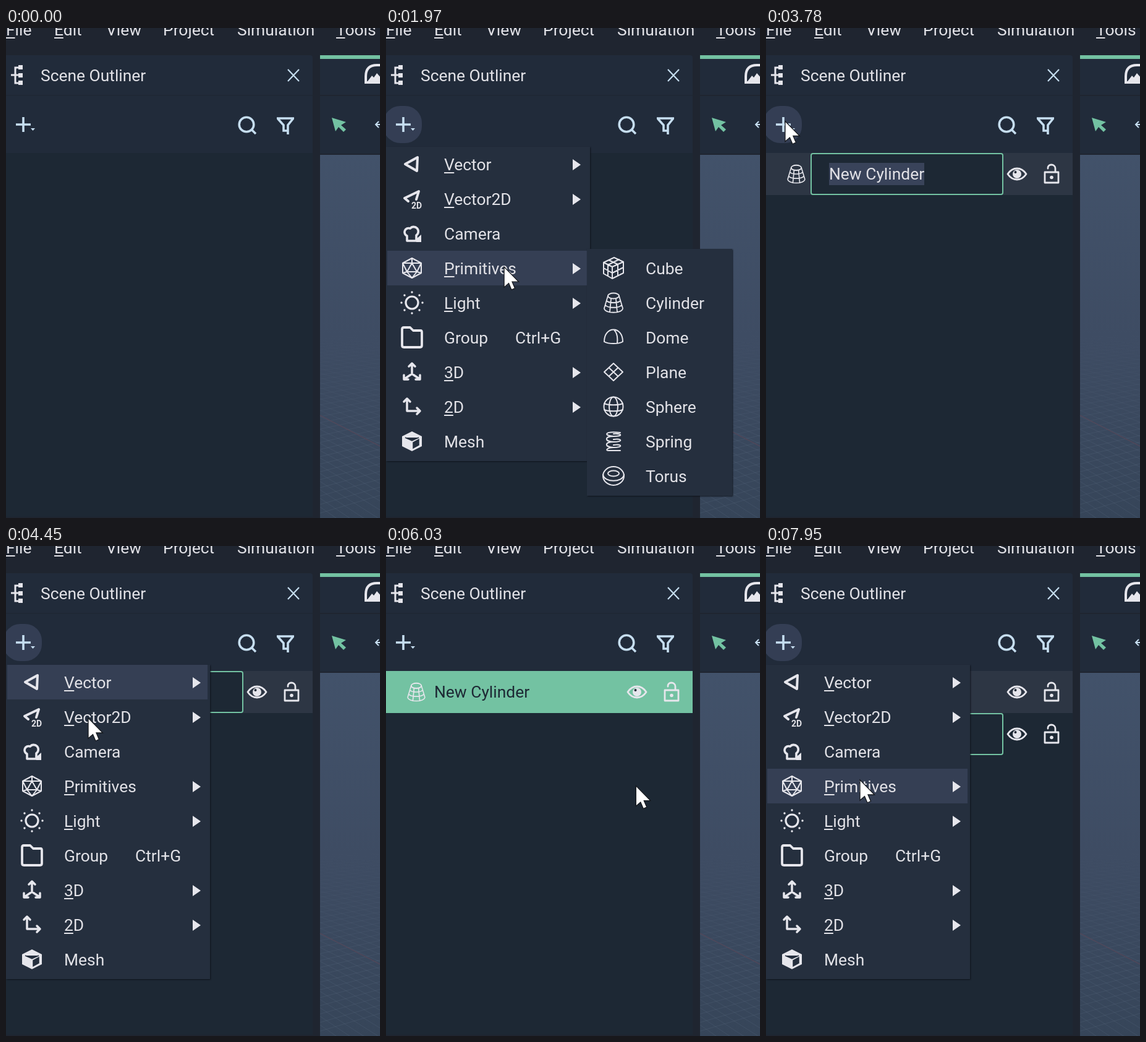
An HTML page for the animation above (8 s loop, 605 by 792 pixels).

```html
<!DOCTYPE html>
<html lang="en">
<head>
<meta charset="utf-8">
<title>Scene Outliner</title>
<style>
  html, body { margin: 0; width: 100%; height: 100%; overflow: hidden; background: #1f2530; }
  svg { display: block; width: 605px; height: 792px; }
  text { font: 26.4px Roboto, sans-serif; fill: #e2e2e7; white-space: pre; }
  .line { fill: none; stroke: #e6e6ec; stroke-width: 2; stroke-linejoin: round; stroke-linecap: round; }
  .solid { fill: #e6e6ec; }
  .tool { fill: none; stroke: #c6def0; stroke-width: 3.6; }
</style>
</head>
<body>
<svg id="stage" viewBox="0 0 605 792">
  <defs>
    <linearGradient id="sky" x2="0" y2="1">
      <stop offset="0" stop-color="#42526a"/>
      <stop offset=".5" stop-color="#3e4c63"/>
      <stop offset="1" stop-color="#364559"/>
    </linearGradient>
    <linearGradient id="fade" gradientUnits="userSpaceOnUse" x1="0" y1="490" x2="0" y2="680">
      <stop offset="0" stop-color="#8fa3bb" stop-opacity="0"/>
      <stop offset="1" stop-color="#8fa3bb" stop-opacity=".1"/>
    </linearGradient>
    <filter id="shadow" x="-10%" y="-10%" width="120%" height="120%" color-interpolation-filters="sRGB">
      <feDropShadow dx="1" dy="1" stdDeviation="1.2" flood-color="#0c1118" flood-opacity=".9"/>
    </filter>
    <clipPath id="viewport"><rect x="508" y="205" width="97" height="587"/></clipPath>
  </defs>

  <rect width="605" height="792" fill="#1f2530"/>
  <path d="M0 44H492Q496 44 496 48V108H0Z" fill="#212b3a"/>
  <rect y="110" width="496" height="92" fill="#212b3a"/>
  <rect y="108" width="496" height="2" fill="#1f2835"/>
  <rect y="202" width="496" height="588" fill="#1d2834"/>
  <rect x="508" y="44" width="97" height="6" fill="#73c2a2"/>
  <rect x="508" y="50" width="97" height="58" fill="#212b3a"/>
  <rect x="508" y="110" width="97" height="93" fill="#212b3a"/>
  <rect x="508" y="205" width="97" height="587" fill="url(#sky)"/>
  <path id="grid" clip-path="url(#viewport)" fill="none" stroke="url(#fade)"/>
  <path d="M508 626L605 676" stroke="#534759" stroke-width="1.3"/>

  <g id="labels"></g>
  <path d="M8 76H20M21 64H15V89H21" class="line" style="stroke-linecap:butt;stroke-linejoin:miter;stroke-width:3"/>
  <path d="M20 60h7v7h-7zM20 73h7v7h-7zM20 85h7v7h-7z" class="solid"/>
  <path d="M456 67L474 86M474 67L456 86" class="tool" style="stroke-width:2.2"/>
  <rect id="button" x="-4" y="126" width="62" height="60" rx="27" fill="#343e54"/>
  <path d="M16 156H40M28 144V168" class="tool"/>
  <path d="M40 162H47L43.5 166Z" fill="#c6def0"/>
  <circle cx="389" cy="156" r="11.8" class="tool"/>
  <path d="M397 164L404 171" class="tool"/>
  <path d="M438 146H466M440 147L449 157V166H456M464 147L456 157V172" class="tool"/>
  <path d="M527 145L550 152L542 157L550 164L546 168L538 160L533 167Z" fill="#73c2a2"/>
  <path d="M606 156H599M603 151L598 156L603 161" class="tool" style="stroke-width:2"/>
  <path d="M606 60H600Q582 60 582 78V88H606" class="line" style="stroke-width:4;stroke-linejoin:miter"/>
  <path d="M585 86L592 77L595 80L600 73L606 80V86Z" class="solid"/>

  <g id="rows"></g>
  <g id="menu"></g>
  <g id="submenu"></g>
  <path id="cursor" d="M0 0V33L7.5 26.5L12 37L17.5 34.5L13 24H23.5Z" fill="#fff" stroke="#15181d" stroke-width="1.3"/>
</svg>

<script>
const $ = id => document.getElementById(id);
const show = (node, on) => { node.style.display = on ? '' : 'none'; };
const line = (d, width = 2) => `<path class="line" d="${d}" style="stroke-width:${width}"/>`;
const solid = d => `<path class="solid" d="${d}"/>`;
const oval = (cy, rx, ry, width = 2) =>
  `<ellipse class="line" cy="${cy}" rx="${rx}" ry="${ry}" style="stroke-width:${width}"/>`;
const text = (x, y, s, mark = false) => `<text x="${x}" y="${y}"${mark ? ' data-mark' : ''}>${s}</text>`;
const at = (x, y, body, scale = 1) => `<g transform="translate(${x} ${y}) scale(${scale})">${body}</g>`;

const rays = Array.from({ length: 8 }, (_, i) => {
  const a = i * Math.PI / 4;
  return `<circle class="solid" cx="${17 * Math.cos(a)}" cy="${17 * Math.sin(a)}" r="1.7"/>`;
}).join('');

// Icons are centred on 0,0.
const icons = {
  vector: line('M-11 0L9 -11L8 11Z', 4),
  vector2d: line('M-6 4L-12 -1L11 -12L7 1', 4) +
    '<text x="-1" y="16" style="font-size:14px;font-weight:700">2D</text>',
  camera: line('M-8 12V4A6 6 0 1 1 -3 -8A7.5 7.5 0 1 1 7 3V12Z', 3.6) + solid('M7 9L15 2V14H7Z'),
  primitives: line('M0 -16L15 -8V8L0 16L-15 8V-8ZM0 -8L-8 6H8ZM0 -16V-8L-15 -8L-8 6L-15 8M0 -8L15 -8L8 6L15 8M-8 6L0 16L8 6'),
  light: oval(0, 10, 10, 3.2) + rays,
  group: line('M-16 -13Q-16 -16 -13 -16H-3L2 -11H14Q16 -11 16 -8V13Q16 16 13 16H-13Q-16 16 -16 13Z', 3.8),
  axes3: line('M0 -13V3L-12 11M0 3L12 11M-5 -9L0 -14L5 -9M-13 5V12H-6M13 5V12H6', 3.5),
  axes2: line('M-8 -13V7H12M-13 -8L-8 -13L-3 -8M8 2L13 7L8 12', 3.5),
  mesh: solid('M0 -16L16 -8V8L0 16L-16 8V-8Z') +
    '<path d="M2 11V2L11 -3V6ZM-11 -6L0 -1L11 -6" fill="#252f3e" stroke="#252f3e" stroke-width="1.5"/>',
  cube: line('M1 -17L16 -10V8L-2 17L-16 9V-9ZM-16 -9L-2 -2L16 -10M-2 -2V17M-8 -13L7 -6V12M9 -14L-9 -5V13M-16 0L-2 8L16 -1'),
  cylinder: line('M-9 -11L-15 9C-15 18 15 18 15 9L9 -11M-11 -3C-7 1 7 1 11 -3M-13 4C-9 9 9 9 13 4M-4 -6L-6 15M4 -6L6 15', 1.8) +
    oval(-11, 9, 4.5),
  dome: line('M-15 7C-15 -19 15 -19 15 7C8 11 -8 11 -15 7M1 -12C6 -7 7 1 6 9'),
  plane: line('M0 -14L15 0L0 14L-15 0ZM-7.5 -7L7.5 7M7.5 -7L-7.5 7'),
  sphere: oval(0, 15.5, 15.5) + oval(0, 7, 15.5) +
    line('M-15 -5C-8 -2 8 -2 15 -5M-15 5C-8 8 8 8 15 5'),
  spring: line('M11 -14C-16 -17 -16 -9 0 -8C16 -8 14 -13 0 -12M0 -8C-15 -8 -15 0 0 1C16 1 14 -5 0 -3M0 1C-15 1 -15 9 0 10C16 10 14 4 0 6M0 10C-10 10 -14 15 -8 15H11'),
  torus: oval(0, 17, 15) + oval(-4, 9, 4.5) + line('M-17 -2C-15 11 15 11 17 -2'),
  eye: line('M-15 0C-7 -12 7 -12 15 0C7 12 -7 12 -15 0Z', 2.8) +
    '<circle class="solid" r="7"/><circle cx="-2.5" cy="-3" r="2" fill="#1d2834"/>',
  lock: line('M-11 -3H11V14H-11ZM-6 -9C-7 -17 6 -17 6 -9V-3', 2.8) +
    '<circle class="solid" cy="5.5" r="2.8"/>'
};

// icon, label, has a submenu, shortcut
const menuItems = [
  ['vector', 'Vector', true], ['vector2d', 'Vector2D', true], ['camera', 'Camera'],
  ['primitives', 'Primitives', true], ['light', 'Light', true], ['group', 'Group', false, 'Ctrl+G'],
  ['axes3', '3D', true], ['axes2', '2D', true], ['mesh', 'Mesh']
];
const shapes = ['Cube', 'Cylinder', 'Dome', 'Plane', 'Sphere', 'Spring', 'Torus'];
const pitch = 56, menuTop = 192, subTop = 360;

$('labels').innerHTML = text(56, 86, 'Scene Outliner') +
  [[0, 'File', true], [78, 'Edit', true], [162, 'View'], [254, 'Project'], [374, 'Simulation'], [534, 'Tools', true]]
    .map(([x, s, mark]) => text(x, 12, s, mark)).join('');

$('menu').innerHTML = '<rect y="192" width="330" height="508" fill="#252f3e" filter="url(#shadow)"/>' +
  '<rect id="menuHover" x="2" width="324" height="56" fill="#353f54"/>' +
  menuItems.map(([icon, label, more, keys], i) => {
    const y = menuTop + 28 + i * pitch;
    return at(42, y, icons[icon]) + text(94, y + 10, label, more) +
      (more ? solid(`M302 ${y - 8}L315 ${y + 1}L302 ${y + 10}Z`) : '') +
      (keys ? text(209, y + 10, keys) : '');
  }).join('');

$('submenu').innerHTML = '<rect x="325" y="357" width="235" height="399" fill="#252f3e" filter="url(#shadow)"/>' +
  '<rect id="subHover" x="327" width="232" height="56" fill="#353f54"/>' +
  shapes.map((label, i) => {
    const y = subTop + 28 + i * pitch;
    return at(368, y, icons[label.toLowerCase()]) + text(420, y + 10, label);
  }).join('');

function outlinerRow(id, label, icon, y, selected) {
  return `<g id="${id}"><rect id="${id}Back" y="${y - 34}" width="496" height="68" fill="none"/>` +
    at(49, y, icons[icon], .92) +
    `<g id="${id}Edit"><rect x="73" y="${y - 33}" width="310" height="66" rx="3" fill="#1d2834" stroke="#73c2a2" stroke-width="2"/>` +
    `<rect x="102" y="${y - 18}" width="${selected}" height="36" fill="#39435a"/>${text(102, y + 9, label)}</g>` +
    `<g id="${id}Name">${text(78, y + 9, label)}</g>` +
    at(406, y, icons.eye) + at(462, y, icons.lock) + '</g>';
}
$('rows').innerHTML = outlinerRow('first', 'New Cylinder', 'cylinder', 236, 154) +
  outlinerRow('second', 'New Cube', 'cube', 304, 118);
show($('secondName'), false);

for (const label of document.querySelectorAll('[data-mark]')) {
  const x = label.getAttribute('x'), y = +label.getAttribute('y') + 3;
  label.insertAdjacentHTML('afterend',
    `<rect x="${x}" y="${y}" width="${label.getSubStringLength(0, 1)}" height="2" fill="#e2e2e7"/>`);
}

let grid = '';
for (let i = 0; i < 34; i++) {
  const y = 500 + 3 * i + .17 * i * i;
  grid += `M508 ${y}L605 ${y - 4 - i * .75}M508 ${y - 10}L605 ${y - 6 + i * 1.9}`;
}
$('grid').setAttribute('d', grid);

// The picture advances in runs of evenly spaced steps: start, end, count.
const runs = [[130, 1130, 8], [1260, 2260, 8], [2400, 2970, 5], [3100, 3380, 3], [3510, 4450, 8],
  [4590, 5220, 5], [5390, 5550, 2], [5710, 6740, 7], [6920, 7950, 7]];
const steps = [0];
for (const [a, b, n] of runs)
  for (let i = 0; i < n; i++) steps.push(a + (b - a) * i / (n - 1));

// Cursor waypoints: time, x, y.
const route = [
  [130, 110, 12], [410, 42, 126], [550, 28, 146], [1130, 28, 146], [1260, 53, 200], [1550, 130, 320],
  [1830, 190, 386], [1980, 300, 400], [2260, 430, 440], [2540, 425, 440], [2970, 367, 391],
  [3380, 290, 290], [3780, 30, 150], [4045, 30, 150], [4315, 110, 240], [4450, 133, 278],
  [4590, 150, 320], [4750, 168, 354], [5070, 187, 376], [5220, 190, 379], [5550, 410, 388],
  [5880, 405, 388], [6740, 41, 170], [6920, 30, 150], [7260, 30, 150], [7600, 90, 270],
  [7780, 146, 366], [7950, 152, 378]
];
const open = {
  button: [[690, 2540], [3775, 5880], [7090, 8000]],
  menu: [[840, 2540], [3905, 5880], [7260, 8000]],
  submenu: [[1825, 2540], [5060, 5880]],
  first: [[3100, 8000]],
  second: [[6220, 8000]],
  firstEdit: [[3100, 5880]],
  firstName: [[5880, 8000]]
};
const during = (id, t) => open[id].some(([a, b]) => t >= a && t < b);

function cursorAt(t) {
  const i = route.findIndex(p => p[0] > t);
  if (i === 0) return route[0].slice(1);
  if (i < 0) return route[route.length - 1].slice(1);
  const [a, b] = [route[i - 1], route[i]], k = (t - a[0]) / (b[0] - a[0]);
  return [a[1] + (b[1] - a[1]) * k, a[2] + (b[2] - a[2]) * k];
}

function hover(node, row, count, top) {
  const on = row >= 0 && row < count;
  show(node, on);
  if (on) node.setAttribute('y', top + row * pitch);
}

function render(t) {
  let i = steps.length - 1;
  while (steps[i] > t + .5) i--;
  const now = steps[i] + .5;
  const [x, y] = cursorAt(steps[i]);
  for (const id in open) show($(id), during(id, now));
  show($('cursor'), i > 0);
  $('cursor').setAttribute('transform', `translate(${x} ${y})`);

  // The highlight trails the pointer by one step.
  const [px, py] = cursorAt(steps[Math.max(0, i - 1)]);
  const sub = during('submenu', now), inMenu = px < 326;
  hover($('menuHover'), sub ? 3 : inMenu ? Math.floor((py - menuTop) / pitch) : -1, menuItems.length, menuTop);
  hover($('subHover'), sub && !inMenu ? Math.floor((py - subTop) / pitch) : -1, shapes.length, subTop);

  const focused = during('firstName', now) && !during('menu', now);
  $('firstBack').setAttribute('fill', focused ? '#73c2a2' : '#2d3644');
  $('firstName').firstChild.style.fill = focused ? '#1d2834' : '';
}

const start = performance.now();
function tick() {
  render((performance.now() - start) % 8000);
  requestAnimationFrame(tick);
}
tick();
</script>
</body>
</html>
```
